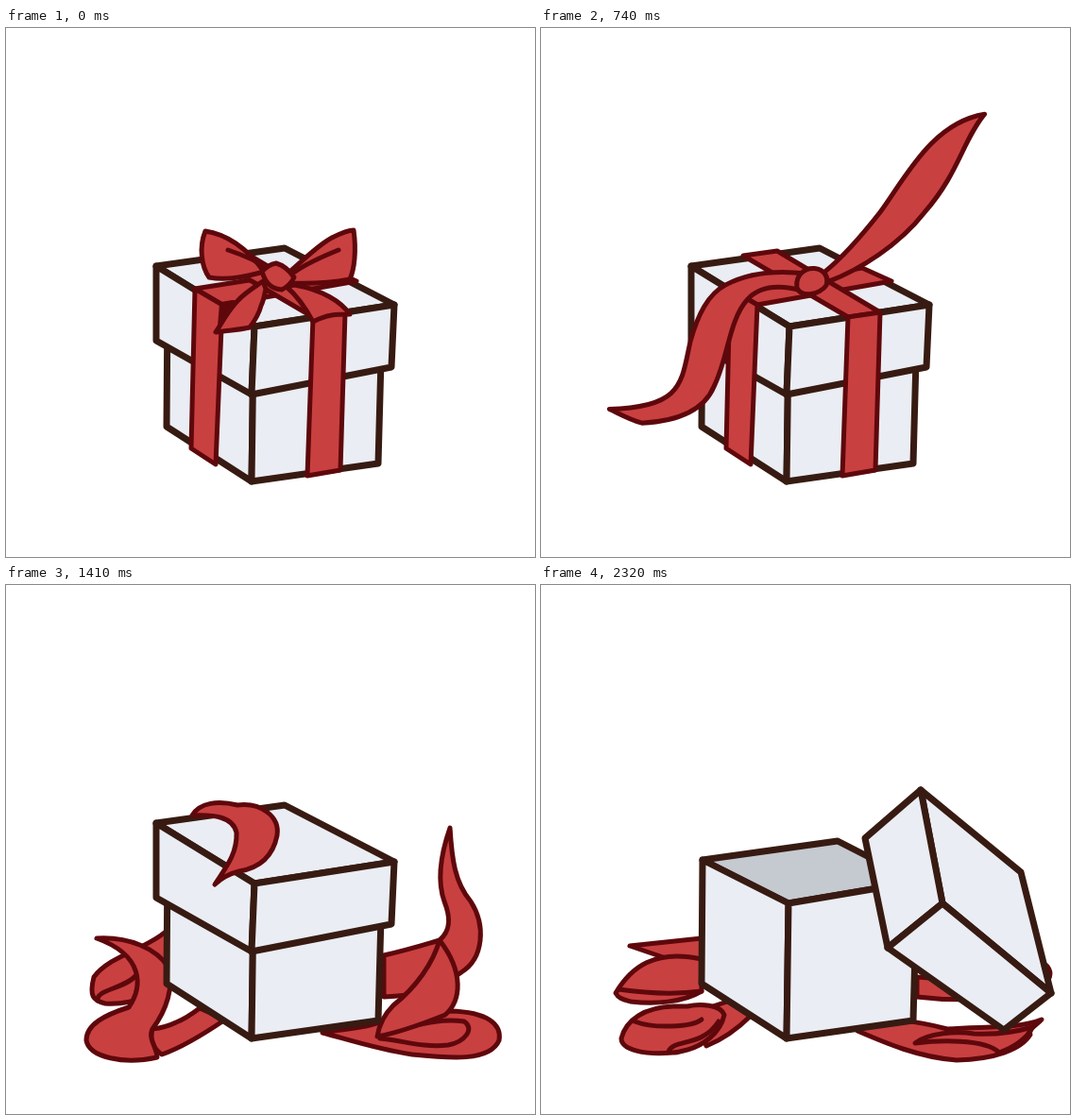
Animation, 560 px wide and 560 px high, one loop 2740 ms. Source, as an HTML page with a canvas:

```html
<!DOCTYPE html>
<html lang="en">
<head>
<meta charset="utf-8">
<title>Gift box</title>
<style>
html, body { margin: 0; width: 100%; height: 100%; overflow: hidden; background: #fff; }
canvas { display: block; }
</style>
</head>
<body>
<canvas id="stage" width="560" height="560"></canvas>
<script>
const ctx = document.getElementById('stage').getContext('2d');
const LOOP = 2740;
const RED = '#c94041', WINE = '#5e080c', PALE = '#eaedf3', BROWN = '#371b12', SHADE = '#c5c9d0';
ctx.lineJoin = ctx.lineCap = 'round';

function draw(d, fill, stroke, width) {
  const path = new Path2D(d);
  if (fill) { ctx.fillStyle = fill; ctx.fill(path); }
  if (stroke) { ctx.strokeStyle = stroke; ctx.lineWidth = width; ctx.stroke(path); }
}
const red = d => draw(d, RED, WINE, 5);
const crease = d => draw(d, null, WINE, 5);
const panel = (d, fill = PALE) => draw(d, fill, BROWN, 7);

// Blend two paths that share the same commands.
function mix(a, b, t) {
  const end = b.match(/-?[\d.]+/g);
  let i = 0;
  return a.replace(/-?[\d.]+/g, n => +n + (end[i++] - n) * t);
}
function shifted(dx, dy, fn) {
  ctx.save();
  ctx.translate(dx, dy);
  fn();
  ctx.restore();
}

// Box
const lidShut = [[159,252], [295,233], [411,293], [263,316], [159,331], [260,388], [408,359]];
const lidOff = [[402,217], [508,304], [540,432], [425,337], [343,268], [367,384], [490,471]];

function box(open) {
  panel('M171 291L314 271L398 314L262 337Z', SHADE);
  panel('M171 291L262 337L260 480L170 422Z');
  panel('M262 337L398 314L394 461L260 480Z');
  const lift = 100 * Math.sin(Math.PI * open);
  const pts = lidShut.map(([x, y], i) =>
    [x + (lidOff[i][0] - x) * open, y + (lidOff[i][1] - y) * open - lift]);
  for (const face of [[0,1,2,3], [0,3,5,4], [3,2,6,5]])
    panel('M' + face.map(i => pts[i].join(' ')).join('L') + 'Z');
}

// Tied ribbon
const left = {
  bow: 'M272 268C262 275 252 281 246 288C240 294 236 300 232 306C229 311 226 316 222 322C232 320 246 320 258 317C264 309 268 302 270 294C273 288 274 281 275 276Z',
  up: 'M280 256C262 240 250 220 238 200C225 170 210 140 190 115C180 98 165 75 150 63C148 85 152 110 165 135C178 165 195 195 215 220C230 240 250 258 272 270Z',
  wave: 'M295 260C265 248 245 228 210 210C180 197 140 196 112 206C75 222 72 266 22 262C30 268 33 279 48 281C85 282 105 266 125 250C170 225 210 240 270 270Z',
  drape: 'M275 260C245 260 210 272 190 298C175 318 177 350 178 385C180 440 185 460 94 464C105 468 118 472 132 477C165 474 200 468 208 435C222 380 190 262 280 282Z',
  loose: 'M222 272C190 282 165 298 150 322C138 350 143 380 139 410C128 450 85 466 27 474C45 478 60 486 77 485C110 483 165 465 174 420C176 370 168 315 222 272Z',
  pile: 'M160 500C125 508 88 500 85 482C85 465 105 455 130 447C145 425 146 392 96 374C130 372 160 385 172 405C178 425 170 450 155 470C150 480 160 490 160 500Z',
  flat: 'M140 495C110 498 85 492 85 480C90 460 110 447 140 446C148 446 150 446 155 446C168 443 190 444 194 455C190 475 170 488 155 492C150 493 145 495 140 495Z'
};
const right = {
  bow: 'M298 260C318 243 330 230 345 222C355 217 362 214 368 214C371 235 369 255 364 266C342 270 322 271 302 270Z',
  wave: 'M297 262C320 246 338 243 350 225C365 208 375 198 394 195C372 215 378 240 355 248C335 255 320 264 303 272Z',
  high: 'M302 256C320 240 340 205 365 175C400 125 440 35 520 22C496 55 486 95 440 160C408 213 350 250 305 266Z',
  fall: 'M302 256C340 200 390 160 440 165C490 170 525 210 541 250C510 215 480 205 445 210C400 215 350 250 305 270Z'
};
const loops = [
  'M273 258C255 232 232 218 211 215C204 232 207 253 215 264C235 268 258 262 273 258Z',
  'M290 265C292 235 288 206 270 204C252 203 240 222 239 242C250 252 270 262 290 265Z'
];
const folds = ['M235 235Q262 244 280 256', 'M264 218Q276 230 279 250'];
const knots = [
  'M271 258C276 252 281 250 286 249C293 251 299 255 305 264C302 270 298 274 292 277C284 276 276 274 271 258Z',
  'M268 268C270 260 278 257 286 258C296 259 301 264 300 268C296 274 290 276 284 276C274 276 270 272 268 268Z',
  'M272 275C270 262 280 252 291 253C302 254 306 264 303 274C300 279 292 283 287 284C278 286 270 280 272 275Z'
];

function wrappedBox() {
  box(0);
  red('M200 276L340 254L371 268L229 293Z');
  red('M214 241L250 236L359 301L325 306Z');
  red('M200 276L229 293L222 462L196 445Z');
  red('M325 306L359 301L354 468L319 474Z');
}

function bow(q, tail) {
  wrappedBox();
  if (q < .5) red('M297 274C310 285 318 298 325 311C340 303 350 303 364 303C355 290 335 277 305 272Z');
  if (!q) draw('M228 292L240 290L226 316Z', WINE, WINE, 4);
  red(mix(loops[0], loops[1], q));
  crease(mix(folds[0], folds[1], q));
  red(mix(right.bow, right.wave, q));
  if (q < .5) crease('M352 235Q320 248 306 258');
  if (q > .8) red('M246 267L255 277L272 274Z');
  red(tail);
  red(mix(knots[0], knots[1], q));
}

function pulled(a, b, k) {
  wrappedBox();
  red(b);
  red(a);
  red(mix(knots[1], knots[2], k));
}

// Ribbon coming loose, then lying on the floor
const tail = [
  'M350 239C388 242 427 253 444 285C461 315 465 365 490 390C515 400 530 375 541 345C538 385 528 410 512 422C470 430 445 390 430 343C442 295 415 262 350 247Z',
  'M400 392C430 385 445 380 459 376C472 365 470 350 464 335C455 310 462 280 470 257C472 290 475 315 492 335C508 360 506 395 482 410C455 430 430 435 400 436Z',
  'M398 415C430 418 470 418 498 411C512 406 512 402 500 403C490 403 480 403 468 402C490 402 505 395 526 398C550 405 540 432 500 434C470 440 430 440 398 436Z'
];
const leftWrap = [
  'M222 272C195 285 178 300 177 330C172 370 172 410 185 437C195 450 215 462 232 466C218 448 205 435 198 410C188 375 185 310 222 285Z',
  'M180 463C172 467 164 469 155 470C152 480 155 490 165 497C185 490 210 475 232 460C223 456 214 452 205 448C197 454 188 460 180 463Z',
  'M182 446C180 452 180 460 178 466C174 475 172 482 175 488C195 480 210 468 222 456C215 450 208 445 200 440C194 442 188 444 182 446Z'
];
const rightWrap = [
  'M286 277C330 292 362 318 369 350C372 385 350 430 322 474C345 475 380 455 400 425C412 395 412 355 408 335C402 305 350 284 298 271Z',
  'M470 451C440 451 410 458 398 462C380 470 355 470 335 474C365 482 395 492 430 497C470 501 512 505 522 482C525 465 510 452 470 451Z',
  'M530 460C505 470 470 467 430 470C400 462 370 455 335 472C365 485 400 500 440 503C480 502 508 492 518 476C515 470 525 466 530 460Z'
];
const flap = [
  'M459 376C452 400 435 425 410 445C400 455 395 465 393 478C410 475 440 465 465 455C482 440 485 410 459 376Z',
  'M520 468C500 474 480 476 458 475C440 472 410 474 396 485C420 482 470 480 485 495C500 490 515 480 520 468Z'
];
const backFold = [
  'M170 366C150 385 110 392 93 415C88 435 92 440 105 443C130 445 150 435 170 430Z',
  'M170 396C120 385 95 405 79 432C82 438 88 439 95 441C120 444 150 442 170 430Z'
];
const scrap = () => red('M197 244C205 230 225 228 245 233C270 230 290 245 287 265C282 290 265 300 247 303C235 306 228 310 221 317C232 300 245 285 244 262C240 245 220 243 197 244Z');

function looseKnot() {
  draw('M199 221C193 228 190 235 190 245', null, WINE, 3);
  red('M263 255C240 245 225 228 199 221C205 205 220 198 235 200C255 205 265 230 280 243Z');
  red('M218 285C225 262 245 250 262 253C290 235 330 228 348 237C357 250 345 264 328 272C305 283 295 302 270 313C245 322 216 318 218 285Z');
  draw('M244 296C248 281 268 273 290 277C280 291 262 299 244 296Z', PALE, WINE, 5);
  draw('M280 272C285 259 302 248 318 251C317 263 302 273 280 272Z', PALE, WINE, 5);
  crease('M256 277C262 264 270 256 285 247');
}

function loosen(s) {
  if (s < .5) red('M350 247C395 258 425 275 433 310C435 340 425 360 411 368L411 295C400 270 380 265 350 256Z');
  red(mix(tail[0], tail[1], s));
  box(0);
  red(mix(leftWrap[0], leftWrap[1], s));
  red(mix(left.loose, left.pile, s));
  if (s < .5) shifted(-14 * s, 22 * s, looseKnot);
  else shifted(0, -38, scrap);
  red(mix(rightWrap[0], rightWrap[1], s));
}

function floorRibbon(u) {
  if (u) red('M94 382L170 374L170 398L132 395Z');
  red(mix(backFold[0], backFold[1], u));
  crease(u < .5 ? 'M138 413C125 428 95 428 97 440' : 'M82 428C110 432 140 434 170 430');
  red(mix(leftWrap[1], leftWrap[2], u));
  red(mix(left.pile, left.flat, u));
  red(mix(tail[1], tail[2], u));
  red(mix(rightWrap[1], rightWrap[2], u));
  if (u < .5) crease('M405 472C430 468 455 458 485 462C497 470 485 484 468 487C440 490 420 482 396 480');
  else crease('M99 462C120 470 160 468 170 460M135 494C140 480 170 490 188 462');
  red(mix(flap[0], flap[1], u));
}

function settle(u, slide) {
  floorRibbon(u);
  box(0);
  if (slide) shifted(...slide, scrap);
}
function unlid(open) {
  floorRibbon(1);
  box(open);
}

const poses = [
  [0, () => bow(0, left.bow)],
  [120, () => bow(.2, mix(left.bow, left.up, .35))],
  [220, () => bow(.45, mix(left.bow, left.up, .7))],
  [320, () => bow(.7, left.up)],
  [430, () => bow(.9, mix(left.up, left.wave, .5))],
  [530, () => bow(1, left.wave)],
  [610, () => pulled(mix(left.wave, left.drape, .52), mix(right.wave, right.high, .35), .4)],
  [740, () => pulled(mix(left.wave, left.drape, .7), mix(right.wave, right.high, .6), .7)],
  [820, () => pulled(mix(left.wave, left.drape, .9), mix(right.wave, right.high, .85), .9)],
  [910, () => pulled(left.drape, right.high, 1)],
  [1030, () => pulled(mix(left.drape, left.loose, .5), right.fall, 1)],
  [1110, () => loosen(0)],
  [1240, () => loosen(.35)],
  [1320, () => loosen(.7)],
  [1410, () => settle(0, [0, 0])],
  [1530, () => settle(.3, [-60, 70])],
  [1630, () => settle(.6, [-80, 150])],
  [1730, () => settle(.85)],
  [1820, () => settle(1)],
  [1910, () => unlid(.12)],
  [2010, () => unlid(.4)],
  [2110, () => unlid(.7)],
  [2220, () => unlid(.92)],
  [2320, () => unlid(1)]
];

function frame() {
  const time = performance.now() % LOOP;
  ctx.fillStyle = '#fff';
  ctx.fillRect(0, 0, 560, 560);
  poses.findLast(([start]) => start <= time)[1]();
  requestAnimationFrame(frame);
}
frame();
</script>
</body>
</html>
```
